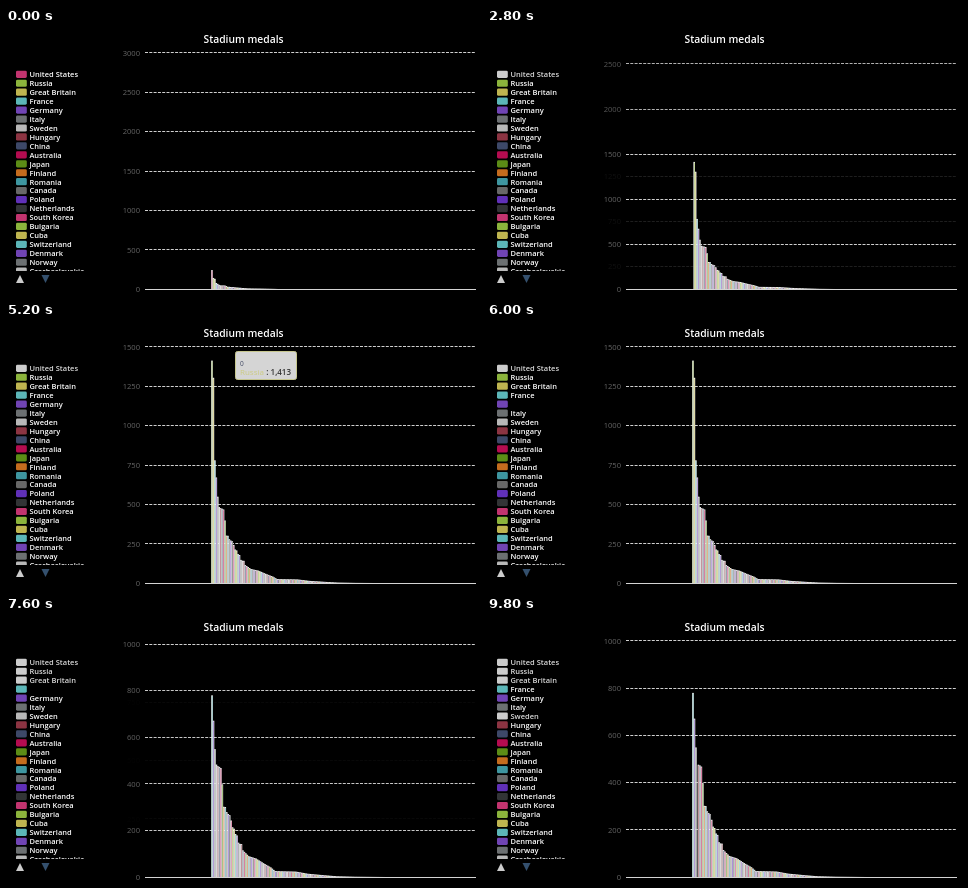
Write an HTML page with a canvas that moves like this. It is 475 px wide and 266 px high and loops after 9900 ms.

```html
<!DOCTYPE html>
<html lang="en">
<head>
<meta charset="utf-8">
<title>Stadium medals</title>
<style>
  html, body { margin: 0; width: 100%; height: 100%; overflow: hidden; background: #000; }
  canvas { display: block; width: 475px; height: 266px; }
</style>
</head>
<body>
<canvas id="chart" width="475" height="266"></canvas>
<script>
const ctx = document.getElementById('chart').getContext('2d');
const LOOP = 9900;
const FONT = '"Open Sans", "Noto Sans", sans-serif';
const PLOT = { left: 139, right: 470, top: 24.9, base: 261.2 };
const HEIGHT = PLOT.base - PLOT.top;
const BARS = { left: 205.2, width: 198.6, count: 138 };
const OFF = '#ccc';

const names = ['United States', 'Russia', 'Great Britain', 'France', 'Germany', 'Italy',
  'Sweden', 'Hungary', 'China', 'Australia', 'Japan', 'Finland', 'Romania', 'Canada',
  'Poland', 'Netherlands', 'South Korea', 'Bulgaria', 'Cuba', 'Switzerland', 'Denmark',
  'Norway', 'Czechoslovakia'];
const palette = ['#c2346f', '#8cb43c', '#bfb550', '#5cb6b8', '#7044b4', '#6c7072',
  '#b8b8b8', '#8c3442', '#3d4868', '#b40c50', '#5c8c16', '#c46c1e', '#3e96a0',
  '#686868', '#6030b8', '#323436'];
const color = i => palette[i % palette.length];

// Leading medal counts, then a tail given by a few points.
const values = [2400, 1413, 1304, 780, 671, 549, 483, 476, 473, 468, 398, 302, 301, 279,
  271, 266, 243, 214, 208, 185, 179, 148, 143, 142];
const tail = [[24, 115], [28, 90], [33, 80], [38, 60], [43, 42], [46, 26], [60, 24],
  [68, 15], [80, 8], [88, 4], [100, 2], [137, 0]];
for (let i = values.length; i < BARS.count; i++) {
  const k = tail.findIndex(p => p[0] >= i);
  const [x1, y1] = tail[k];
  const [x0, y0] = tail[Math.max(0, k - 1)];
  values.push(x1 === x0 ? y1 : y0 + (y1 - y0) * (i - x0) / (x1 - x0));
}

const hides = [{ i: 0, at: 2702 }, { i: 2, at: 6550 }, { i: 1, at: 7252 }, { i: 6, at: 9650 }];
const scales = [
  { at: -1000, max: 3000, step: 500 },
  { at: 2702, max: 1500, step: 250 },
  { at: 7252, max: 1000, step: 200 }
];
const hovers = [[0, -1], [1200, 0], [3500, -1], [5950, 4], [6050, 2], [6800, 1],
  [7450, 3], [7700, 4], [7850, 5], [8000, 6]];

const clamp = v => Math.min(1, Math.max(0, v));
const ease = v => 0.5 - 0.5 * Math.cos(Math.PI * clamp(v));
const shift = (t, at) => ease((t - at) / 400);
const isHidden = (i, t) => hides.some(h => h.i === i && t >= h.at);

function text(str, x, y, size, fill, align = 'left', weight = 400) {
  ctx.font = `${weight} ${size}px ${FONT}`;
  ctx.textAlign = align;
  ctx.fillStyle = fill;
  ctx.fillText(str, x, y);
}

function roundRect(x, y, w, h, r) {
  ctx.beginPath();
  ctx.roundRect(x, y, w, h, r);
}

function triangle(x, y, dir, fill) {
  ctx.fillStyle = fill;
  ctx.beginPath();
  ctx.moveTo(x - 4, y + 4 * dir);
  ctx.lineTo(x + 4, y + 4 * dir);
  ctx.lineTo(x, y - 4 * dir);
  ctx.fill();
}

function tick(v, unit, alpha) {
  const y = PLOT.base - v * unit;
  if (alpha <= 0 || y < -8) return;
  ctx.globalAlpha = alpha;
  if (v > 0) {
    const row = Math.floor(y) + 0.5;
    ctx.strokeStyle = '#d0d0d0';
    ctx.lineWidth = 1;
    ctx.setLineDash([3, 1.3]);
    ctx.beginPath();
    ctx.moveTo(PLOT.left, row);
    ctx.lineTo(PLOT.right, row);
    ctx.stroke();
    ctx.setLineDash([]);
  }
  text(String(v), 134, y + 2.8, 7.6, '#666', 'right');
  ctx.globalAlpha = 1;
}

// Draws both tick sets cross-fading and returns pixels per unit.
function drawAxis(t) {
  const n = scales.filter(s => t >= s.at).length - 1;
  const now = scales[n];
  const old = scales[Math.max(0, n - 1)];
  const p = shift(t, now.at);
  const unit = HEIGHT / old.max * (1 - p) + HEIGHT / now.max * p;
  const kept = v => v <= old.max && v % old.step === 0;
  for (let v = 0; v <= now.max; v += now.step) tick(v, unit, kept(v) ? 1 : p);
  for (let v = 0; v <= old.max; v += old.step) {
    if (v > now.max || v % now.step) tick(v, unit, 1 - p);
  }
  return unit;
}

// Each bar is a white frame around a thin coloured core.
function drawBars(t, unit) {
  const grow = ease((t + 205) / 1000);
  const gone = hides.map(h => ({ i: h.i, p: shift(t, h.at) }));
  const pitch = BARS.width / (BARS.count - gone.reduce((s, g) => s + g.p, 0));
  values.forEach((v, i) => {
    if (isHidden(i, t)) return;
    const rank = i - gone.reduce((s, g) => s + (g.i < i ? g.p : 0), 0);
    const x = BARS.left + rank * pitch;
    const h = v * unit * grow;
    ctx.fillStyle = '#fff';
    ctx.fillRect(x, PLOT.base - h, pitch + 0.1, h);
    ctx.fillStyle = color(i);
    ctx.fillRect(x + pitch * 0.4, PLOT.base - h + 0.7, pitch * 0.36, Math.max(0, h - 0.7));
  });
  ctx.fillStyle = '#d4d4d4';
  ctx.fillRect(PLOT.left, Math.floor(PLOT.base), PLOT.right - PLOT.left, 1);
}

function drawLegend(t) {
  const hovered = hovers.filter(h => t >= h[0]).pop()[1];
  ctx.save();
  ctx.beginPath();
  ctx.rect(0, 30, 130, 213);
  ctx.clip();
  names.forEach((name, i) => {
    const y = 46.3 + i * 8.95;
    const off = isHidden(i, t);
    ctx.fillStyle = off ? OFF : color(i);
    roundRect(10, y - 3.6, 10.8, 7.2, 1.4);
    ctx.fill();
    if (off || i !== hovered) {
      text(name, 23.4, y + 2.8, 7.5, off ? '#dcdcdc' : '#fff', 'left', 600);
    }
  });
  ctx.restore();
  triangle(14, 251, 1, '#ccc');
  triangle(39.5, 251, -1, '#34506e');
}

function drawTooltip(t) {
  const alpha = Math.min(clamp((t - 4650) / 200), 1 - clamp((t - 5500) / 350));
  if (alpha <= 0) return;
  ctx.globalAlpha = alpha;
  roundRect(229.5, 29.5, 61, 28, 2);
  ctx.fillStyle = 'rgba(249,249,249,.86)';
  ctx.fill();
  ctx.strokeStyle = '#c6c68e';
  ctx.lineWidth = 1;
  ctx.stroke();
  text('0', 234, 43.5, 6.5, '#3c4460');
  text('Russia', 234, 53, 8, '#cccb82');
  text(': 1,413', 285, 53, 8, '#333', 'right', 600);
  ctx.globalAlpha = 1;
}

function draw(t) {
  ctx.fillStyle = '#000';
  ctx.fillRect(0, 0, 475, 266);
  const unit = drawAxis(t);
  drawBars(t, unit);
  text('Stadium medals', 237.5, 15.3, 10.3, '#fff', 'center', 600);
  drawLegend(t);
  drawTooltip(t);
}

const start = performance.now();
function loop() {
  draw((performance.now() - start) % LOOP);
  requestAnimationFrame(loop);
}
loop();
</script>
</body>
</html>
```
